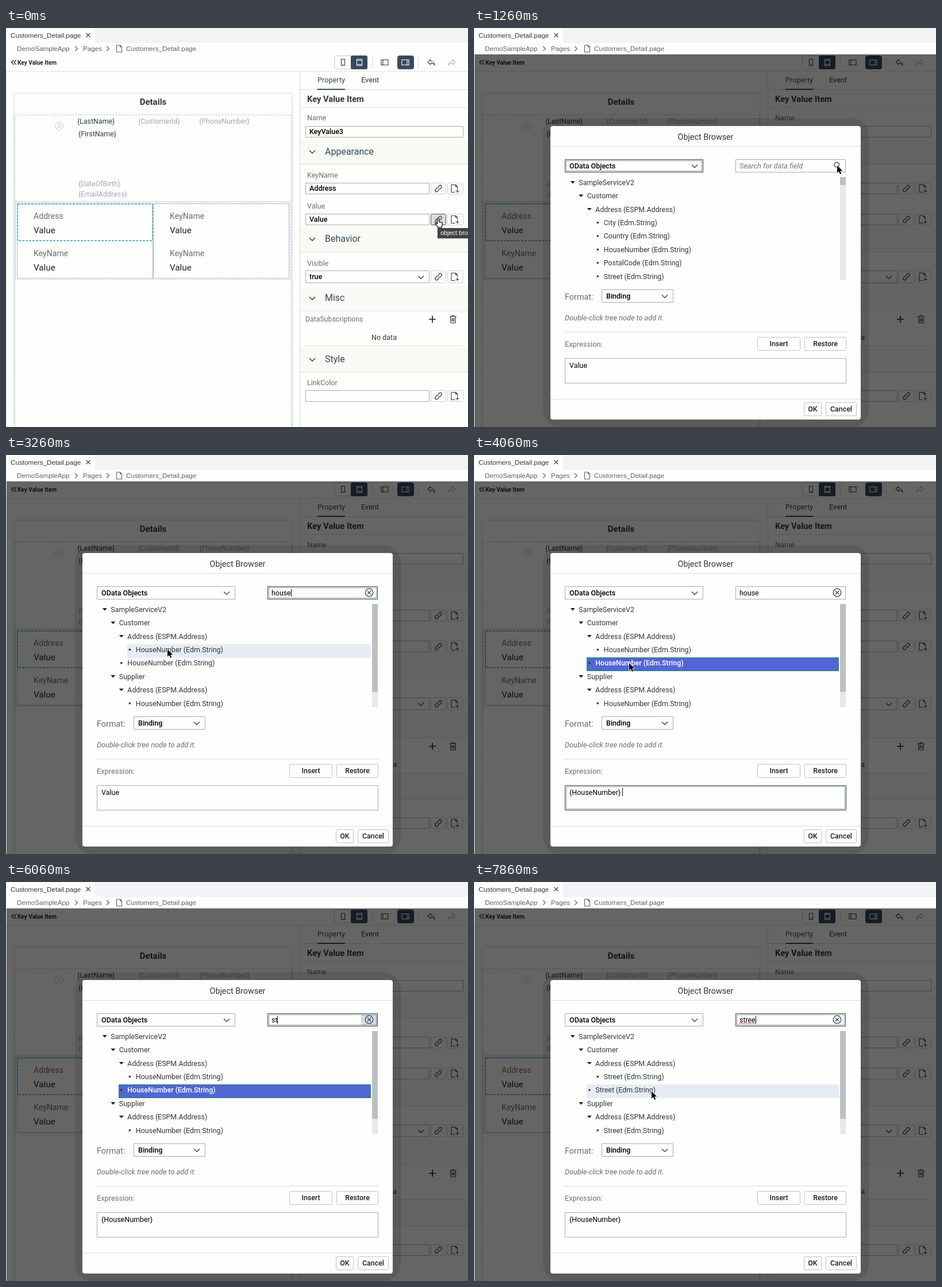
An HTML page with a canvas that plays this animation: 804 by 696 pixels, repeating every 8 s.

```html
<!DOCTYPE html>
<html lang="en">
<head>
<meta charset="utf-8">
<title>Object Browser</title>
<style>
html, body { margin: 0; width: 100%; height: 100%; overflow: hidden; background: #fefefc; }
canvas { display: block; }
</style>
</head>
<body>
<canvas id="stage" width="804" height="696"></canvas>
<script>
const ctx = document.getElementById('stage').getContext('2d');
const LOOP = 8000, PAPER = '#fefefc', INK = '#32363a', LABEL = '#6a6d70', NAVY = '#354a5f', FIELD = '#a9acae';
const SYSTEM = '"Liberation Sans", Arial, sans-serif';

const ICONS = {
  close: 'M-3.5-3.5L3.5 3.5M3.5-3.5L-3.5 3.5',
  right: 'M-2-4L2.5 0L-2 4',
  down: 'M-5-2.5L0 2.5L5-2.5',
  back: 'M-.5-4L-4.5 0L-.5 4M4-4L0 0L4 4',
  page: 'M-4.5-6H1.5L4.5-3V6H-4.5ZM1.5-6V-3H4.5',
  link: 'M-.5-3l2-2a2.3 2.3 0 0 1 3.5 3.5l-2.5 2.5a2.3 2.3 0 0 1-3 .2M.5 3l-2 2a2.3 2.3 0 0 1-3.5-3.5l2.5-2.5a2.3 2.3 0 0 1 3-.2',
  addPage: 'M.5 6.5H-6V-6.5H1.5L4.5-3.5V.5M1.5-6.5V-3.5H4.5M4.5 1.5V7.5M1.5 4.5H7.5',
  undo: 'M-1-5L-6-.5L-1 4V1.5C3 1 5 2.5 6 5.5C6 1 3.5-2.5-1-2.5Z',
  redo: 'M1-5L6-.5L1 4V1.5C-3 1-5 2.5-6 5.5C-6 1-3.5-2.5 1-2.5Z',
  phone: 'M-3-5.5H3V5.5H-3ZM-1 3.5H1',
  tablet: 'M-4.5-5.5H4.5V5.5H-4.5ZM-4.5-3.5H4.5M-4.5 3.5H4.5',
  leftPane: 'M-6-4.5H6V4.5H-6ZM-3-4.5V4.5',
  rightPane: 'M-6-4.5H6V4.5H-6ZM3-4.5V4.5',
  plus: 'M-6 0H6M0-6V6',
  trash: 'M-6-4.5H6M-2-4.5V-6.5H2V-4.5M-4.5-4.5L-4 6.5H4L4.5-4.5M-2-2V4M0-2V4M2-2V4',
  person: 'M7 0A7 7 0 1 1-7 0A7 7 0 1 1 7 0M2.5-2A2.5 2.5 0 1 1-2.5-2A2.5 2.5 0 1 1 2.5-2M-4.5 5C-3 0 3 0 4.5 5',
  search: 'M3.5-1.5A4.2 4.2 0 1 1-4.9-1.5A4.2 4.2 0 1 1 3.5-1.5M2.5 2L6.5 6',
  clear: 'M6.8 0A6.8 6.8 0 1 1-6.8 0A6.8 6.8 0 1 1 6.8 0M-3-3L3 3M3-3L-3 3',
  caretDown: 'M-4-2.2H4L0 2.2Z',
  arrow: 'M0 0V12.8L3 10L5 14.8L7.2 13.9L5.2 9.2H9.2Z',
  hand: 'M-1.5 1a1.5 1.5 0 0 1 3 0v5l5 1.3c1 .4 1.2 1 1 2l-1 4.5v2h-7.5v-1.5l-4-5c-.6-1 .8-2 1.7-1.2l1.8 1.6z'
};

function fill(x, y, w, h, color) {
  ctx.fillStyle = color;
  ctx.fillRect(x, y, w, h);
}

function box(x, y, w, h, border, color = PAPER, radius = 0, dash = [], lineWidth = 1) {
  ctx.beginPath();
  ctx.roundRect(x + .5, y + .5, w - 1, h - 1, radius);
  if (color) { ctx.fillStyle = color; ctx.fill(); }
  ctx.setLineDash(dash);
  ctx.lineWidth = lineWidth;
  ctx.strokeStyle = border;
  ctx.stroke();
  ctx.setLineDash([]);
}

// y is the middle of the capital letters
function text(string, x, y, size = 12.5, color = INK, style = '', align = 'left', family = 'Roboto, sans-serif') {
  ctx.font = `${style} ${size}px ${family}`;
  ctx.textAlign = align;
  ctx.fillStyle = color;
  ctx.fillText(string, x, y + size * .36);
  return ctx.measureText(string).width;
}

function icon(name, x, y, color = INK, width = 1.1, body) {
  const path = new Path2D(ICONS[name]);
  ctx.save();
  ctx.translate(x, y);
  if (body) { ctx.fillStyle = body; ctx.fill(path); }
  ctx.strokeStyle = color;
  ctx.lineWidth = width;
  ctx.lineJoin = 'round';
  if (width) ctx.stroke(path);
  ctx.restore();
}

function drawHeader() {
  fill(0, 0, 804, 696, PAPER);
  fill(155, 0, 649, 26, '#f3f3f5');
  text('Customers_Detail.page', 8, 12.5, 11.7, '#333', '', 'left', SYSTEM);
  icon('close', 143, 12.5, '#444', 1.2);
  for (const [label, x] of [['DemoSampleApp', 19], ['Pages', 134], ['Customers_Detail.page', 209]])
    text(label, x, 36, 11.7, '#616161', '', 'left', SYSTEM);
  icon('right', 122, 36, '#616161');
  icon('right', 177, 36, '#616161');
  icon('page', 197, 36, '#616161');

  icon('back', 14, 60, '#222', 1.3);
  text('Key Value Item', 20, 60, 10.1, '#222', 'bold');
  box(571, 48, 58, 24, '#c5c8ca', PAPER, 3);
  box(600, 48, 29, 24, NAVY, NAVY, 2);
  box(681, 48, 29, 24, NAVY, NAVY, 3);
  icon('phone', 586.5, 60);
  icon('tablet', 615, 60, '#fff');
  icon('leftPane', 659, 60);
  icon('rightPane', 695, 60, '#fff');
  icon('undo', 740, 60, '#45494d');
  icon('redo', 776, 60, '#b4b6b8');
  fill(637, 50, 1, 20, '#d9d9d9');
  fill(717, 50, 1, 20, '#d9d9d9');
  fill(0, 75, 804, 1, '#e2e3e3');
}

function drawPage() {
  fill(0, 76, 1, 620, '#e6e6e6');
  ctx.save();
  ctx.shadowColor = 'rgba(0,0,0,.22)';
  ctx.shadowBlur = 5;
  fill(15, 115, 482, 600, PAPER);
  ctx.restore();
  text('Details', 256, 129, 15, INK, 'bold', 'center');
  box(15, 151, 482, 580, '#a9c9db', null, 0, [3, 2]);
  icon('person', 92.5, 171, '#d0d0d0', 1);
  text('{LastName}', 124, 163, 12.4, '#2f3c48');
  text('{FirstName}', 126, 185, 12.4, '#2f3c48');
  for (const [label, x, y] of [['{CustomerId}', 230, 163], ['{PhoneNumber}', 336, 163], ['{DateOfBirth}', 126, 272], ['{EmailAddress}', 126, 290]])
    text(label, x, y, 12.4, '#a4a9ae');
  fill(16, 302, 480, 1, '#d5d9db');
  box(16, 304, 479, 135, '#a9c9db', null, 0, [3, 2]);
  box(19, 306, 474, 131, '#b4bdc6', PAPER);
  fill(255, 307, 2, 129, '#b9b9b9');
  for (const [label, x, y] of [['Address', 48, 328], ['KeyName', 285, 328], ['KeyName', 48, 393], ['KeyName', 285, 393]]) {
    text(label, x, y, 14.1, LABEL);
    text('Value', x, y + 25, 15.2, '#222');
  }
  box(19.5, 306.5, 236, 65, '#5fb6d9', null, 0, [4, 2], 2);
}

function drawSection(title, y, height) {
  fill(512, y, 292, height, '#f9f9f5');
  fill(512, y + height, 292, 1, '#e2e3e3');
  icon('down', 533, y + height / 2, NAVY, 1.6);
  text(title, 555, y + height / 2 - .8, 16, NAVY);
}

function drawBindable(label, y, value, { pressed = false, height = 20 } = {}) {
  const top = y - height / 2;
  text(label, 524, y - 24, 12.5, LABEL);
  box(521, top, 216, height, FIELD);
  text(value, 528, y - .8, 12.5, '#000', '500');
  box(739, top, 27, height, pressed ? '#555' : '#cfd1d2', pressed ? '#dcdcdc' : PAPER, 2);
  box(768, top, 28, height, '#cfd1d2', PAPER, 2);
  icon('link', 752.5, y);
  icon('addPage', 781, y);
}

function drawProperties(pressed) {
  fill(511, 76, 1, 620, '#d9dadb');
  text('Property', 542, 90.2, 12.7, NAVY);
  text('Event', 618, 90.2, 12.8);
  fill(512, 107, 292, 1, '#d4d9de');
  fill(542, 106, 48, 2, NAVY);
  text('Key Value Item', 524, 123.5, 14.7, INK, 'bold');
  fill(512, 138, 292, 1, '#e2e3e3');
  text('Name', 524, 156.5, 12.5, LABEL);
  box(521, 171, 275, 20, FIELD);
  text('KeyValue3', 528, 180.2, 12.5, '#000', '500');

  drawSection('Appearance', 195, 42);
  drawBindable('KeyName', 280, 'Address');
  drawBindable('Value', 334, 'Value', { pressed });
  drawSection('Behavior', 347, 43);
  drawBindable('Visible', 434, 'true', { height: 22 });
  icon('down', 722, 435);
  drawSection('Misc', 450, 43);
  text('DataSubscriptions', 521, 507.4, 12.3, LABEL);
  icon('plus', 742, 508, '#222', 1.7);
  icon('trash', 778, 508, '#333');
  text('No data', 658, 539.2, 12.5, INK, '', 'center');
  fill(521, 554, 275, 1, '#d9d9d9');
  drawSection('Style', 557, 43);
  drawBindable('LinkColor', 642, '');
}

function button(label, x, y, w, enabled = true) {
  ctx.globalAlpha = enabled ? 1 : .45;
  box(x, y, w, 24, '#bfc3c6', PAPER, 2);
  text(label, x + w / 2, y + 11.5, 12.4, '#1d1f21', '500', 'center');
  ctx.globalAlpha = 1;
}

function focusRing(x, y, w, h) {
  box(x, y, w, h, NAVY, null);
  box(x + 2, y + 2, w - 4, h - 4, '#222', null, 0, [1, 1]);
}

// Each row: [label, level]
function treeRows(filter) {
  const leaf = name => name + ' (Edm.String)', address = 'Address (ESPM.Address)';
  const top = [['SampleServiceV2', 0], ['Customer', 1], [address, 2]];
  if (!filter)
    return [...top, ...['City', 'Country', 'HouseNumber', 'PostalCode', 'Street'].map(name => [leaf(name), 3])];
  return [...top, [leaf(filter), 3], [leaf(filter), 2], ['Supplier', 1], [address, 2], [leaf(filter), 3]];
}

function drawTree(state) {
  const ROW = 23.4, TOP = 259.4, { pointer } = state;
  const inside = pointer && pointer[0] > 158 && pointer[0] < 635 && pointer[1] > TOP && pointer[1] < 440;
  const hovered = inside ? Math.floor((pointer[1] - TOP) / ROW) : -1;
  treeRows(state.filter).forEach(([label, level], i) => {
    const x = 182.3 + level * 14.5, y = 269.3 + i * ROW, top = Math.round(TOP + i * ROW), left = Math.round(x - 15);
    const selected = state.selected && i === 4;
    if (selected) box(left, top, 635 - left, 24, '#1f8a5a', '#5166d6');
    else if (i === hovered) fill(left, top, 635 - left, 24, '#e5ecf4');
    if (label.includes('Edm')) fill(x - 12, y - 1.5, 3, 3, '#222');
    else icon('caretDown', x - 10.5, y, '#222', 0, '#222');
    text(label, x, y, 12.4, selected ? '#fff' : INK, selected ? '500' : '');
  });
  fill(637, 260, 10, 180, '#e8e8e8');
  fill(637, 260, 10, state.filter ? 153 : 14, '#bbbfbf');
}

function drawSearch(state) {
  const { query, searchFocus, caret } = state;
  box(455, 229, 192, 23, FIELD);
  if (state.clearHover) fill(618, 231, 28, 19, '#d6dbe1');
  if (searchFocus) focusRing(455, 229, 192, 23);
  const width = query ? text(query, 462, 240.5, 12.4, '#000') : 0;
  if (!query && !searchFocus) text('Search for data field', 462, 240.5, 12.7, '#74777a', 'italic');
  if (searchFocus && caret) fill(Math.round(462 + width), 234, 1, 13, '#000');
  if (state.misspelled) {
    ctx.setLineDash([2, 1]);
    ctx.strokeStyle = '#e0393e';
    ctx.lineWidth = 1.5;
    ctx.beginPath();
    ctx.moveTo(462, 246.5);
    ctx.lineTo(462 + width, 246.5);
    ctx.stroke();
    ctx.setLineDash([]);
  }
  icon(query ? 'clear' : 'search', 632, 240, NAVY, 1.3);
}

function drawDialog(state) {
  fill(1, 46, 803, 650, 'rgba(0,0,0,.6)');
  ctx.beginPath();
  ctx.roundRect(120, 157, 567, 539, 30);
  ctx.fillStyle = 'rgba(0,0,0,.1)';
  ctx.fill();
  box(133, 171, 540, 512, PAPER, PAPER, 3);
  text('Object Browser', 403, 190, 14.3, INK, '', 'center');
  fill(133, 206, 540, 1, '#dcdddd');
  fill(156, 530, 494, 1, '#dcdddd');
  fill(133, 647, 540, 1, '#dcdddd');

  box(158, 229, 241, 23, FIELD);
  if (state.selectFocus) focusRing(158, 229, 241, 23);
  text('OData Objects', 166, 240.5, 12.5, '#000', '500');
  icon('down', 384, 241);
  drawSearch(state);
  drawTree(state);

  text('Format:', 158, 468.5, 14.4, LABEL);
  box(222, 456, 125, 23, FIELD);
  text('Binding', 230, 467.5, 12.5, '#000', '500');
  icon('down', 332, 468);
  text('Double-click tree node to add it.', 158, 505.5, 12.7, LABEL, 'italic');
  text('Expression:', 158, 551.5, 12.8, LABEL);
  button('Insert', 493, 539, 75);
  button('Restore', 575, 539, 73);
  button('OK', 574, 653, 31, state.okEnabled);
  button('Cancel', 612, 653, 54);

  box(158, 576, 490, 44, FIELD);
  if (state.textFocus) {
    box(158, 576, 490, 44, NAVY, null);
    box(160, 578, 486, 40, '#8494a5', null);
  }
  const width = text(state.expression, 166, 588, 12.5, '#000');
  if (state.textFocus && state.caret) fill(Math.round(166 + width + 3), 581, 1, 14, '#000');
}

// Latest entry of a [time, value] list
const at = (list, time) => list.reduce((value, [start, next]) => time >= start ? next : value, null);

const QUERY = [[0, ''], [1660, 'h'], [1860, 'ho'], [2060, 'hous'], [2260, 'house'], [5660, ''], [5860, 's'], [6060, 'st'], [6260, 'stre'], [6460, 'stree']];
const FILTER = [[2660, 'HouseNumber'], [6660, 'Street']];
// Pointer tip; null while typing hides it
const POINTER = [
  [0, [751, 331]], [860, [700, 300]], [1060, [645, 268]], [1260, [632, 240]], [1660, null],
  [2660, [600, 262]], [2860, [480, 300]], [3060, [330, 333]], [3260, [281, 339]], [3460, [274, 358]], [3660, [270, 363]],
  [4860, [270, 376]], [5060, [270, 389]], [5260, [420, 330]], [5460, [632, 240]], [5860, null],
  [6660, [560, 280]], [6860, [340, 345]], [7060, [231, 360]], [7260, [245, 370]], [7460, [275, 368]], [7660, [298, 366]], [7860, [309, 365]]
];

function stateAt(ms) {
  const step = Math.floor((ms - 60) / 200), time = 60 + step * 200;
  const during = (from, to) => time >= from && time < to;
  return {
    pointer: at(POINTER, Math.max(time, 0)),
    query: at(QUERY, time) || '',
    filter: at(FILTER, time),
    selected: during(3860, 6660),
    selectFocus: during(660, 1460),
    searchFocus: during(1460, 3860) || time >= 5460,
    textFocus: during(4060, 5460),
    clearHover: during(1660, 2660) || during(5460, 6660),
    misspelled: time >= 6860,
    okEnabled: time >= 860,
    expression: time >= 4060 ? '{HouseNumber}' : 'Value',
    caret: Math.floor((step + 1) / 2.5) % 2 === 0
  };
}

function draw(ms) {
  const state = stateAt(ms), open = ms >= 260;
  drawHeader();
  drawPage();
  drawProperties(!open);
  if (open) {
    drawDialog(state);
    if (state.pointer) {
      icon('arrow', ...state.pointer, '#fff', 1.4);
      icon('arrow', ...state.pointer, '#000', 0, '#000');
    }
    return;
  }
  icon('hand', 752, 332, '#000', 1.2, '#fff');
  if (ms < 60) {
    fill(751, 349, 53, 18, '#424242');
    text('object browser', 756, 357.5, 10.9, '#fff', '', 'left', SYSTEM);
  }
}

function tick(now) {
  draw(now % LOOP);
  requestAnimationFrame(tick);
}
draw(0);
requestAnimationFrame(tick);
</script>
</body>
</html>
```
